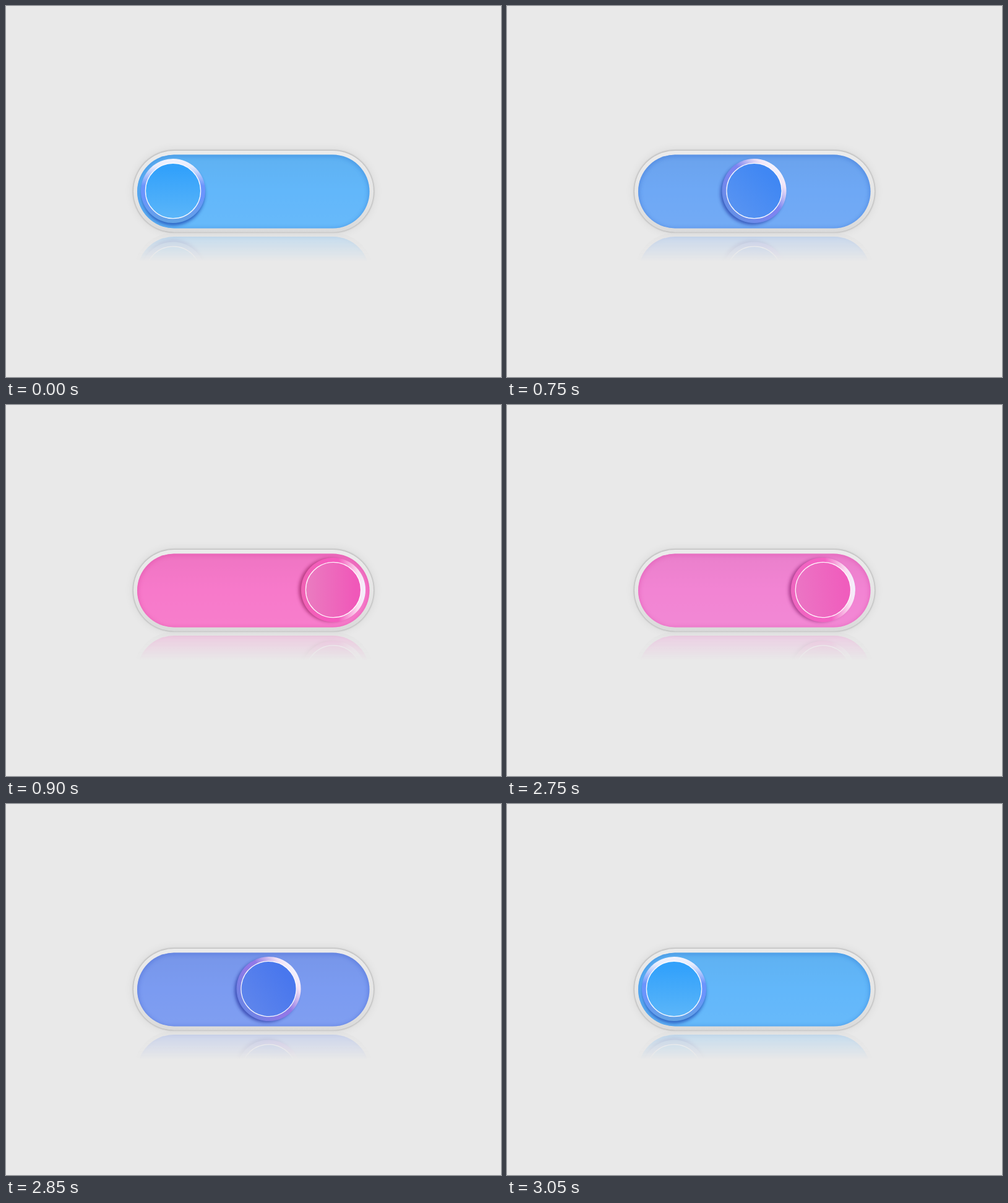
These frames come from a looping animation (800 px wide and 600 px high, 3.55 s). An HTML page:

```html
<!DOCTYPE html>
<html lang="en">
<head>
<meta charset="utf-8">
<title>Toggle switch</title>
<style>
  html, body { margin: 0; width: 100%; height: 100%; overflow: hidden; background: #e9e9e9; }
  svg { display: block; width: 100%; height: 100%; }
</style>
</head>
<body>
<svg viewBox="0 0 800 600" xmlns="http://www.w3.org/2000/svg">
  <defs>
    <linearGradient id="bezelFill" x1="0" y1="0" x2="0" y2="1">
      <stop offset="0" stop-color="#ebebeb"/>
      <stop offset=".5" stop-color="#e6e6e6"/>
      <stop offset="1" stop-color="#dadada"/>
    </linearGradient>
    <linearGradient id="sheen" x1="0" y1="0" x2="0" y2="1">
      <stop offset="0" stop-color="#000" stop-opacity=".035"/>
      <stop offset=".5" stop-color="#000" stop-opacity="0"/>
      <stop offset=".5" stop-color="#fff" stop-opacity="0"/>
      <stop offset="1" stop-color="#fff" stop-opacity=".035"/>
    </linearGradient>
    <linearGradient id="ringFill" gradientUnits="userSpaceOnUse" x1="0" y1="-52" x2="0" y2="52">
      <stop offset="0" stop-color="#f3f4fe"/>
      <stop offset=".12" stop-color="#e6ecfd" id="ringLight"/>
      <stop offset=".42" id="ringSide"/>
      <stop offset=".6" id="ringSide2"/>
      <stop offset="1" id="ringBase"/>
    </linearGradient>
    <linearGradient id="capFill" gradientUnits="userSpaceOnUse" x1="0" y1="-45" x2="0" y2="45">
      <stop offset=".1" id="capTop"/>
      <stop offset="1" id="capEnd"/>
    </linearGradient>
    <linearGradient id="fade" gradientUnits="userSpaceOnUse" x1="0" y1="366" x2="0" y2="413">
      <stop offset="0" stop-color="#fff" stop-opacity=".3"/>
      <stop offset=".15" stop-color="#fff" stop-opacity=".27"/>
      <stop offset="1" stop-color="#fff" stop-opacity="0"/>
    </linearGradient>
    <mask id="fadeMask" maskUnits="userSpaceOnUse" x="190" y="366" width="420" height="50">
      <rect x="190" y="366" width="420" height="50" fill="url(#fade)"/>
    </mask>
    <clipPath id="trackClip">
      <rect x="212" y="240.5" width="375.5" height="119" rx="59.5"/>
    </clipPath>
    <filter id="blurS" filterUnits="userSpaceOnUse" x="180" y="210" width="440" height="180"><feGaussianBlur stdDeviation="1.3"/></filter>
    <filter id="blurL" filterUnits="userSpaceOnUse" x="160" y="190" width="480" height="220"><feGaussianBlur stdDeviation="7"/></filter>
    <filter id="blurIn" filterUnits="userSpaceOnUse" x="190" y="220" width="420" height="160"><feGaussianBlur stdDeviation="3.2"/></filter>
    <filter id="blurKnob" filterUnits="userSpaceOnUse" x="-80" y="-80" width="160" height="160"><feGaussianBlur stdDeviation="2.6"/></filter>
  </defs>

  <rect width="800" height="600" fill="#e9e9e9"/>
  <rect x="203" y="231" width="394" height="137" rx="68.5" fill="#000" opacity=".055" filter="url(#blurL)"/>
  <rect x="205" y="233" width="390" height="133.5" rx="66.7" fill="#000" opacity=".2" filter="url(#blurS)"/>

  <g id="toggle">
    <rect x="206" y="234" width="388" height="131.7" rx="65.8" fill="url(#bezelFill)"/>
    <g clip-path="url(#trackClip)">
      <rect id="track" x="211" y="240" width="378" height="120"/>
      <rect x="211" y="240" width="378" height="120" fill="url(#sheen)"/>
      <rect id="shade" x="211" y="240.5" width="377.5" height="122" rx="60" fill="none" stroke-width="6" opacity=".75" filter="url(#blurIn)"/>
      <g id="knob">
        <circle id="shadow" cy="4.5" r="51.5" opacity=".9" filter="url(#blurKnob)"/>
        <circle r="52" fill="url(#ringFill)"/>
        <circle r="44.6" fill="url(#capFill)" stroke="#fff" stroke-opacity=".92" stroke-width="1.3"/>
      </g>
    </g>
  </g>
  <g mask="url(#fadeMask)">
    <use href="#toggle" transform="matrix(1 0 0 -1 0 732.5)"/>
  </g>
</svg>
<script>
const LOOP = 3550, TICK = 50, TRAVEL = 300;
const LEFT = 270, RIGHT = 529, MIDDLE = 299;
const el = id => document.getElementById(id);

// progress, then: track, cap top, cap end, ring side, ring base, inner shade, knob shadow
const palette = [
  [0,    '#62b7fa', '#32a1fb', '#5cb6f9', '#6a94fc', '#62a3e4', '#3f8fe0', '#2a5fc0'],
  [.25,  '#62b7fa', '#35a0fb', '#58b0f9', '#6c92fb', '#62a0e6', '#3f8fe0', '#2c5cc0'],
  [.5,   '#6ea8f5', '#4087f3', '#5793f2', '#7c84f0', '#648fe6', '#4a82dd', '#3554b8'],
  [.595, '#7a9bf1', '#4878ed', '#5d85ec', '#8f78e6', '#6a84e4', '#5577dc', '#3b4bb2'],
  [.667, '#9d8fe9', '#6659e0', '#8a79e6', '#b76fe0', '#8577de', '#7868d4', '#4b40aa'],
  [.833, '#d789dd', '#c05bcd', '#c874d2', '#e066cf', '#cf69cc', '#c062c4', '#89409f'],
  [.925, '#f285d4', '#f05dbd', '#eb74c4', '#f464c4', '#ee66c0', '#e45fb9', '#ab3c90'],
  [1,    '#f779ca', '#f058b9', '#ea7cc0', '#f55cbe', '#f062b4', '#e557ae', '#b3397f']
];

const rgb = hex => [1, 3, 5].map(i => parseInt(hex.slice(i, i + 2), 16));

function mix(a, b, k) {
  const to = rgb(b);
  return 'rgb(' + rgb(a).map((v, i) => Math.round(v + (to[i] - v) * k)) + ')';
}

function coloursAt(p) {
  let i = 1;
  while (i < palette.length - 1 && p > palette[i][0]) i++;
  const a = palette[i - 1], b = palette[i];
  const k = (p - a[0]) / (b[0] - a[0]);
  return a.slice(1).map((c, n) => mix(c, b[n + 1], k));
}

// The switch moves at constant speed, in ticks of 50 ms.
function progress(ms) {
  const t = Math.floor(ms / TICK) * TICK;
  const on = (t - 600) / TRAVEL;
  const off = (t - 2750 + 21) / TRAVEL;
  const p = t < 2750 ? on : 1 - off;
  return Math.max(0, Math.min(1, p));
}

function draw(ms) {
  const p = progress(ms);
  const [track, top, end, side, base, shade, shadow] = coloursAt(p);
  const x = LEFT + (RIGHT - LEFT) * p;
  el('knob').setAttribute('transform', `translate(${x} ${MIDDLE}) rotate(${90 * p})`);
  el('track').setAttribute('fill', track);
  el('shade').setAttribute('stroke', shade);
  el('shadow').setAttribute('fill', shadow);
  const stops = { capTop: top, capEnd: end, ringSide: side, ringSide2: side, ringBase: base };
  for (const id in stops) el(id).setAttribute('stop-color', stops[id]);
  el('ringLight').setAttribute('stop-color', mix('#e6ecfd', '#fbdcf0', p));
}

const start = performance.now();
function loop() {
  draw((performance.now() - start) % LOOP);
  requestAnimationFrame(loop);
}
loop();
</script>
</body>
</html>
```
